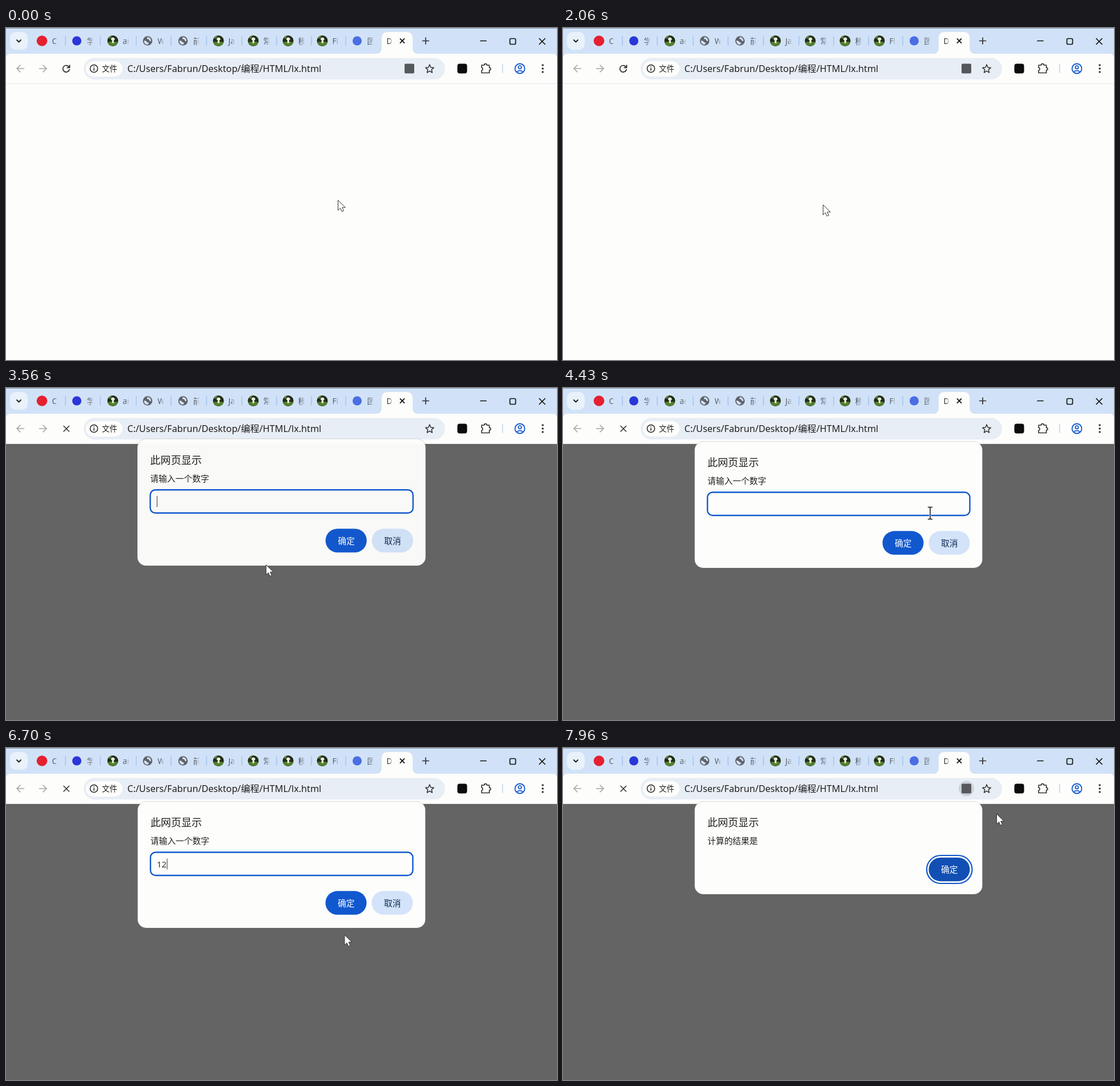
These frames come from a looping animation (965x581 px, 8000 ms). An HTML page:

```html
<!DOCTYPE html>
<html lang="zh-CN">
<head>
<meta charset="utf-8">
<style>
html, body { margin: 0; width: 100%; height: 100%; overflow: hidden; background: #fdfdfb; }
svg { display: block; width: 965px; height: 581px; }
text { font-family: 'Noto Sans', 'Noto Sans CJK SC', 'Noto Sans CJK', sans-serif; white-space: pre; }
.line { fill: none; stroke-linecap: round; stroke-linejoin: round; }
</style>
</head>
<body>
<svg id="stage" viewBox="0 0 965 581" xmlns="http://www.w3.org/2000/svg"></svg>
<script>
const LOOP = 8000, PROMPT_AT = 3460, ALERT_AT = 7112;
const BLUE = '#1158cf', PAGE = '#fdfdfb', STRIP = '#d1e2f8';

const rect = (x, y, w, h, r, fill, extra = '') =>
  `<rect x="${x}" y="${y}" width="${w}" height="${h}" rx="${r}" fill="${fill}" ${extra}/>`;
const circle = (x, y, r, fill, extra = '') =>
  `<circle cx="${x}" cy="${y}" r="${r}" fill="${fill}" ${extra}/>`;
const line = (d, color = '#222', width = 1.7, extra = '') =>
  `<path class="line" d="${d}" stroke="${color}" stroke-width="${width}" ${extra}/>`;
// y is the middle of the glyphs
const label = (x, y, size, str, fill = '#1f1f1f', extra = '') =>
  `<text x="${x}" y="${y + size * 0.37}" font-size="${size}" fill="${fill}" ${extra}>${str}</text>`;
const group = (id, body) => `<g id="${id}">${body}</g>`;

const fade = (id, color) => `<linearGradient id="${id}">
  <stop offset="0" stop-color="${color}" stop-opacity="0"/>
  <stop offset=".6" stop-color="${color}"/></linearGradient>`;

const icons = {
  red: x => circle(x, 22.5, 9.3, '#e5202f'),
  paw: x => circle(x, 22.5, 8, '#2a36d8'),
  pet: x => circle(x, 22.5, 8, '#4a6fe3'),
  photo: x => circle(x, 22.5, 9.5, '#1f2e14') +
    `<path d="M${x - 9} 25a9.5 9.5 0 0 0 18 0q-9-3-18 0z" fill="#557f2b"/>` +
    `<path d="M${x - 8} 17.5a9.5 9.5 0 0 1 7-4.500l-3 6z" fill="#5d7d3c"/>` +
    `<path d="M${x - 3} 20.5q0-4 3.300-4t3.300 4l-1.800 1v5h-3v-5z" fill="#eef1e6"/>`,
  globe: x => circle(x, 22.5, 8.3, '#5f6368') +
    `<path d="M${x - 6.5} 22q4 0 5 2t3 1v3q-3 2-5 0-3-2-3-6zM${x - 1} 16.5q3-1 5 1t2 5q-2 2-3-1t-4-2z" fill="${STRIP}"/>`
};

const tabs = [
  [63, 'red', 'C'], [124, 'paw', '学'], [187, 'photo', 'ar'], [248, 'globe', 'W'], [310, 'globe', '前'],
  [372, 'photo', 'Ja'], [433, 'photo', '常'], [494, 'photo', '移'], [554, 'photo', 'Fl'], [615, 'pet', '团']
];

function tab([x, icon, title], i) {
  const sep = i < 9 ? rect(x + 40.3, 14, 1.6, 17, 0.8, '#a5c6ee') : '';
  return icons[icon](x) + label(x + 17.5, 23, 13.5, title, '#555b63') +
    rect(x + 22, 12, 12, 22, 0, 'url(#fadeStrip)') + sep;
}

function browser() {
  return rect(0, 0, 965, 98, 0, STRIP) + rect(0, 0, 965, 1, 0, '#7f9cc0') +
    rect(7, 7, 31, 31, 10, '#e9f2fb') + line('M19 21l3.500 3.500 3.500-3.500', '#1f1f1f', 1.9) +
    tabs.map(tab).join('') +
    `<path d="M0 98V53q0-8 8-8H648q10 0 10-10V18q0-11 11-11h32q11 0 11 11v17q0 10 10 10H957q8 0 8 8v45z" fill="${PAGE}"/>` +
    label(666.5, 23, 13.5, 'D', '#333') + rect(671, 12, 10, 22, 0, 'url(#fadePage)') +
    line('M690.500 19l7 7m0-7l-7 7', '#1f1f1f', 1.8) +
    line('M729.500 22.500h11M735 17v11', '#333', 1.7) +
    line('M831 22.500h10M882.500 20.500q0-2 2-2h6q2 0 2 2v6q0 2-2 2h-6q-2 0-2-2zM934 18.500l10 10m0-10l-10 10', '#111', 1.7) +
    rect(0, 97, 965, 1, 0, '#e3e8ec') +
    line('M31.500 71H19m6-6l-6 6 6 6', '#a3a5a8', 1.6) +
    line('M58.500 71H71m-6-6l6 6-6 6', '#a3a5a8', 1.6) +
    group('reload', line('M110.500 68.500a5.800 5.800 0 1 0 .6 4M111.500 65v4.300h-4.300', '#2b2b2b', 1.7)) +
    group('stop', line('M101 66.500l9.500 9.500m0-9.500l-9.500 9.500', '#333', 1.6)) +
    rect(136, 52.5, 633, 37.5, 18.7, '#e8eef6') + rect(140, 58, 64, 27, 13.5, PAGE) +
    circle(154, 71, 6.6, 'none', 'stroke="#222" stroke-width="1.5"') +
    line('M154 70.500v3.500M154 67.800v.1', '#222', 1.6) +
    label(168, 71.5, 13.5, '文件') +
    label(212.5, 71, 16.2, 'C:/Users/Fabrun/Desktop/编程/HTML/lx.html') +
    circle(706.5, 71, 13.5, '#ccd3da', 'id="halo"') +
    rect(698, 62.5, 17, 17, 2, '#55585c', 'id="translate"') +
    line('M742 64l2.100 5 5.200.4-4 3.500 1.200 5.200-4.500-2.800-4.500 2.800 1.200-5.200-4-3.500 5.200-.4z', '#333', 1.5) +
    rect(790.5, 62.5, 17, 17, 4, '#0c0c0c') +
    line('M833 65h4.500a2.300 2.300 0 0 1 4.600 0h4.400v4.300a2.300 2.300 0 0 1 0 4.600v4.600h-13.500v-4.200a2.700 2.700 0 0 0 0-5.200z', '#333', 1.7) +
    rect(868.7, 63, 1.8, 16, 0.9, '#c3dbf8') +
    circle(900, 71, 8.5, 'none', `stroke="${BLUE}" stroke-width="1.8"`) +
    circle(900, 68.7, 2.7, 'none', `stroke="${BLUE}" stroke-width="1.7"`) +
    line('M894.500 76.800q5.500-4.300 11 0', BLUE, 1.7) +
    [65, 71, 77].map(y => circle(940, y, 1.8, '#333')).join('');
}

const panel = h => rect(230.5, 93.5, 504, h, 15, PAGE, 'stroke="#000" stroke-opacity=".14"') +
  label(253, 130.5, 18, '此网页显示');
const pill = (x, y, fill, color, str, id) =>
  rect(x, y, 72, 41.5, 20.7, fill, `id="${id}"`) + label(x + 21.5, y + 21, 14.8, str, color);

function dialogs() {
  return group('prompt', panel(221.5) + label(253, 163, 14.7, '请输入一个数字') +
      rect(253, 182.5, 459.5, 40.5, 9, PAGE, 'id="field"') +
      label(264, 203, 15, '', '#333', 'id="typed"') +
      rect(264.5, 193.5, 1, 19, 0, '#333', 'id="caret"') +
      pill(559.5, 250.3, BLUE, '#fff', '确定', 'ok') +
      pill(640.5, 250.3, '#d3e3f9', '#0f2a55', '取消', 'cancel')) +
    group('alert', panel(162.5) + label(253, 163, 14.7, '计算的结果是') +
      rect(637, 188, 79.5, 49, 24.5, PAGE, `stroke="${BLUE}" stroke-width="2.2"`) +
      pill(640.5, 191.7, '#114fb4', '#fff', '确定', 'done'));
}

const beam = 'M-3.500-10.500h2.500q1 0 1 1.200V9.300q0 1.200-1 1.200h-2.500M3.500-10.500h-2.500q-1 0-1 1.200V9.300q0 1.200 1 1.200h2.500';
const pointers =
  `<path id="arrow" d="M.5.5v17.500l4-3.800 2.700 6 3.200-1.300-2.700-5.900h5.700z" fill="#fff" stroke="#333" stroke-width="1" stroke-linejoin="round"/>` +
  group('beam', line(beam, '#fff', 3.2) + line(beam, '#111', 1.5));

document.getElementById('stage').innerHTML =
  `<defs>${fade('fadeStrip', STRIP)}${fade('fadePage', PAGE)}</defs>` +
  rect(0, 0, 965, 581, 0, PAGE) + browser() +
  rect(0, 98, 965, 483, 0, '#646464', 'id="scrim"') +
  dialogs() + group('pointer', pointers);

const $ = id => document.getElementById(id);
const set = (id, attrs) => { for (const k in attrs) $(id).setAttribute(k, attrs[k]); };
const show = (id, on) => set(id, { visibility: on ? 'visible' : 'hidden' });
const clamp = v => Math.max(0, Math.min(1, v));

// time, x, y
const route = [
  [0, 581, 301], [1300, 581, 301], [1680, 505, 311], [2000, 455, 309],
  [3740, 455, 309], [4100, 643, 219], [6300, 643, 219], [6670, 592, 329],
  [6930, 603, 273], [7230, 603, 273], [7520, 676, 200], [7820, 759, 115], [LOOP, 759, 115]
];

function pointerAt(t) {
  const i = route.findIndex(k => k[0] > t);
  const [t0, x0, y0] = route[i - 1], [t1, x1, y1] = route[i];
  const p = (t - t0) / (t1 - t0), e = p * p * (3 - 2 * p);
  return [x0 + (x1 - x0) * e, y0 + (y1 - y0) * e];
}

function place(id, cy, dy, scale, opacity) {
  set(id, {
    transform: `translate(482.5 ${cy + dy}) scale(${scale}) translate(-482.5 ${-cy})`,
    opacity
  });
}

function openDialog(id, cy, p) {
  const rest = (1 - p) ** 3;
  place(id, cy, -20 * rest, 1 + 0.008 * rest, Math.min(1, p * 2.42));
}

function draw(t) {
  const loading = t >= PROMPT_AT, answered = t >= ALERT_AT;
  show('reload', !loading);
  show('stop', loading);
  show('scrim', loading);
  show('translate', !loading || t >= 7450);
  show('halo', t >= 7450);

  const closing = clamp((t - ALERT_AT) / 170);
  set('prompt', { display: loading && closing < 1 ? 'inline' : 'none' });
  if (answered) place('prompt', 204, -32 * closing, 1 + 0.043 * closing, 1 - closing);
  else openDialog('prompt', 204, clamp((t - PROMPT_AT) / 250));
  set('alert', { display: answered ? 'inline' : 'none' });
  openDialog('alert', 174.5, clamp((t - ALERT_AT) / 250));

  const typed = '12'.slice(0, t < 5900 ? 0 : t < 6100 ? 1 : 2);
  $('typed').textContent = typed;
  set('field', { stroke: answered ? '#b9bcc0' : BLUE, 'stroke-width': answered ? 1 : 2.4 });
  set('caret', {
    x: 264.5 + typed.length * 8.6,
    opacity: !answered && (t - PROMPT_AT - 40) % 1060 < 530 ? 1 : 0
  });

  const [x, y] = pointerAt(t);
  const inside = (l, top, r, b) => x > l && x < r && y > top && y < b;
  const overField = loading && !answered && inside(252, 182, 713, 223);
  set('ok', { fill: loading && inside(559, 250, 631, 292) ? '#0f4fbb' : BLUE });
  set('pointer', { transform: `translate(${x} ${y})` });
  show('arrow', !overField);
  show('beam', overField);
}

const start = performance.now();
function tick() {
  draw((performance.now() - start) % LOOP);
  requestAnimationFrame(tick);
}
tick();
</script>
</body>
</html>
```
